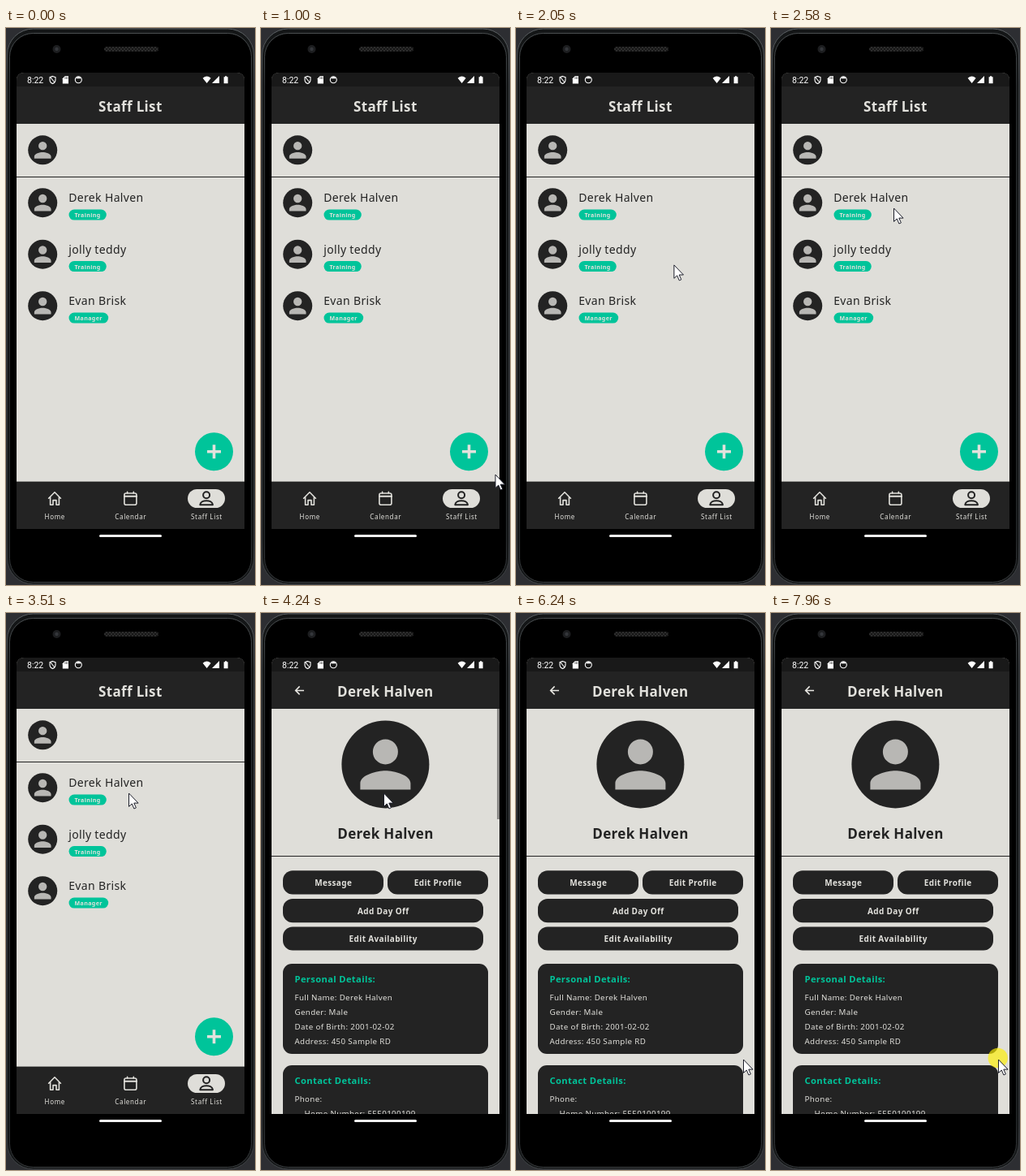
These frames come from a looping animation (307 by 686 pixels, 8 s). An HTML page:

```html
<!DOCTYPE html>
<html lang="en">
<head>
<meta charset="utf-8">
<title>Staff list</title>
<style>
  html, body { margin: 0; width: 100%; height: 100%; overflow: hidden; background: #2d2e32; }
  svg { display: block; width: 100%; height: 100%; }
  text { font-family: "Noto Sans", sans-serif; letter-spacing: .35px; fill: #e2e1dc; }
  .b { font-weight: 700; }
  .m { text-anchor: middle; }
  .dark { fill: #232323; }
  .teal { fill: #00c49a; }
</style>
</head>
<body>
<svg viewBox="0 0 307 686" id="stage">
  <defs>
    <clipPath id="screen"><path d="M13 617V65Q13 55 23 55H284Q294 55 294 65V617Z"/></clipPath>
    <pattern id="mesh" width="4" height="4" patternUnits="userSpaceOnUse">
      <path d="M0 4L4 0M0 0L4 4" stroke="#303030" stroke-width=".9"/>
    </pattern>
    <linearGradient id="rim" x2="0" y2="1">
      <stop offset="0" stop-color="#5c6164"/>
      <stop offset=".1" stop-color="#34383a"/>
      <stop offset=".92" stop-color="#2c3032"/>
      <stop offset="1" stop-color="#44484b"/>
    </linearGradient>
  </defs>

  <rect width="307" height="686" fill="#2d2e32"/>
  <rect x="1.5" y="1" width="304" height="684" rx="32" fill="#141617" stroke="url(#rim)"/>
  <rect x="4.5" y="6.5" width="298" height="676" rx="29" fill="#000" stroke="url(#rim)" stroke-width=".8"/>
  <circle cx="62.5" cy="26" r="5" fill="#1d1e20"/>
  <circle cx="62.5" cy="26" r="2.2" fill="#34363a"/>
  <rect x="121" y="23" width="67" height="6" rx="3" fill="#171717"/>
  <rect x="121" y="23" width="67" height="6" rx="3" fill="url(#mesh)"/>

  <g clip-path="url(#screen)">
    <rect x="13" y="55" width="281" height="562" fill="#dfded9"/>
    <rect x="13" y="55" width="281" height="63" class="dark"/>
    <rect x="13" y="55" width="281" height="17" fill="#191919"/>
    <g id="list"></g>
    <g id="profile"></g>
    <g id="status" fill="#fff">
      <text x="26" y="67.5" style="font:10.5px Roboto,sans-serif;letter-spacing:0;fill:#fff">8:22</text>
      <g fill="none" stroke="#fff" stroke-width="1.1">
        <path d="M57.5 59.4L61 60.7V63.7Q61 67 57.5 68.6Q54 67 54 63.7V60.7Z"/>
        <path d="M55 61L60 67"/>
        <circle cx="89.3" cy="63.8" r="4"/>
      </g>
      <path d="M72.6 59.3H77V68.5H69.8V62.2Z"/>
      <path d="M72.9 60.6V62.6M74.4 60.6V62.6M75.9 60.6V62.6" stroke="#191919" stroke-width=".7"/>
      <path d="M85.8 62.2Q89.3 58 92.8 62.2Z"/>
      <path d="M242.6 61.8Q247.6 57.4 252.6 61.8L247.6 68Z"/>
      <path d="M263 59V68H254Z"/>
      <path d="M268.6 60.2H270V59.2H272.2V60.2H273.6V68.2H268.6Z"/>
    </g>
  </g>
  <rect x="115" y="624" width="77" height="3" rx="1.5" fill="#f4f4f4"/>

  <circle id="tap" r="12.2" fill="#fff000" opacity=".66"/>
  <path id="cursor" d="M0 0V16.4L3.8 13 6.4 19 8.9 17.9 6.3 12.1H11.6Z" fill="#fff" stroke="#1d1f2b" stroke-width="1" stroke-linejoin="round"/>
</svg>
<script>
const $ = id => document.getElementById(id);
const PERSON = 'Derek Halven';

const text = (x, y, size, str, cls = '', extra = '') =>
  `<text x="${x}" y="${y}" font-size="${size}" class="${cls}" ${extra}>${str}</text>`;
const box = (x, y, w, h, r, cls = 'dark') =>
  `<rect x="${x}" y="${y}" width="${w}" height="${h}" rx="${r}" class="${cls}"/>`;
const avatar = (x, y, r) =>
  `<circle cx="${x}" cy="${y}" r="${r}" class="dark"/>
   <path transform="translate(${x} ${y}) scale(${r * .0718}) translate(-12 -12)" fill="#b8b7b4"
     d="M12 12a4 4 0 1 0 0-8a4 4 0 0 0 0 8zm0 2c-2.67 0-8 1.34-8 4v2h16v-2c0-2.66-5.33-4-8-4z"/>`;
const rule = y => box(13, y, 281, 1, 0);
const title = str => text(153.3, 103, 17, str, 'b m');

function staffRow([name, role, badge], i) {
  const y = 215.2 + i * 63.5;
  return avatar(45.2, y, 18) + text(77.2, y - 1, 14, name, 'dark') +
    box(77.5, y + 8.4, badge, 13, 6.5, 'teal') + text(84.5, y + 17.9, 7.1, role, 'b');
}

function listPage() {
  const staff = [[PERSON, 'Training', 46.3], ['jolly teddy', 'Training', 46.3], ['Evan Brisk', 'Manager', 48.7]];
  const tabs = [[60, 'Home'], [153.5, 'Calendar'], [247.2, 'Staff List']];
  return title('Staff List') + avatar(45.2, 150.3, 18) + rule(183) + staff.map(staffRow).join('') +
    `<circle cx="256.5" cy="521.8" r="23.5" class="teal"/>
     <path d="M248 521.8H265M256.5 513.3V530.3" stroke="#e2e1dc" stroke-width="3.6"/>` +
    box(13, 558.6, 281, 58.4, 0) +
    `<rect x="224" y="568" width="46" height="23" rx="11.5" fill="#dfded9"/>
     <g fill="none" stroke="#e2e1dc" stroke-width="1.6" stroke-linejoin="round" stroke-linecap="round">
       <path d="M52.6 579.2L60 571.8L67.4 579.2M54.6 577.4V587.2H58V581.6H62V587.2H65.4V577.4"/>
       <rect x="145.9" y="573" width="15" height="14.2" rx="2"/>
       <path d="M146 576.8H161" stroke-width="2"/>
       <path d="M149.6 571.2V573M157.3 571.2V573"/>
       <g stroke="#232323" stroke-width="2"><circle cx="247.1" cy="575.2" r="4"/>
       <path d="M239.3 587.2C239.8 580.6 254.4 580.6 254.9 587.2Z"/></g>
     </g>` +
    tabs.map(([x, s]) => text(x + .3, 605, 8, s, 'm', 'style="letter-spacing:.65px"')).join('');
}

function profilePage() {
  const buttons = [[27, 317.3, 124, 'Message'], [156, 317.3, 124, 'Edit Profile'],
    [27, 352, 247, 'Add Day Off'], [27, 386.4, 247, 'Edit Availability']];
  const facts = ['Full Name: ' + PERSON, 'Gender: Male', 'Date of Birth: 2001-02-02', 'Address: 450 Sample RD'];
  return title(PERSON) +
    `<path d="M53 95.4H42.8M47.6 90.4L42.6 95.4L47.6 100.4" fill="none" stroke="#e8e7e2" stroke-width="1.5"/>` +
    avatar(153.4, 186.4, 54) + text(153.5, 277.6, 17, PERSON, 'b m dark') + rule(299) +
    buttons.map(([x, y, w, s]) => box(x, y, w, 29.2, 12) + text(x + w / 2 + .2, y + 18.8, 10, s, 'b m')).join('') +
    box(27, 432, 253, 111, 11) + text(41.5, 455, 11.2, 'Personal Details:', 'b teal') +
    facts.map((s, i) => text(41.5, 477.4 + i * 17.9, 9.75, s)).join('') +
    box(27, 557, 253, 90, 11) + text(41.5, 580, 11.2, 'Contact Details:', 'b teal') +
    text(41.5, 602.4, 9.75, 'Phone:') + text(53.4, 620.3, 9.75, 'Home Number: 5550100199') +
    '<rect id="bar" x="291" y="118" width="3" height="136" fill="#8b8a88"/>';
}

$('list').innerHTML = listPage();
$('profile').innerHTML = profilePage();

const LOOP = 8000, STEP = 65.8, ENTER = 600, OPEN = 4240;
// time, x, y of the pointer tip
const path = [[600, 300, 671], [1390, 278, 429], [1585, 255.5, 399.5], [2245, 169, 246], [2570, 151.5, 222],
  [4560, 151.5, 222], [4850, 195, 322], [5140, 253, 452], [5400, 266, 458], [5800, 274, 510], [6190, 280.5, 550]];

function pointerAt(t) {
  const s = ENTER + Math.floor((t - ENTER) / STEP) * STEP;
  const i = path.findIndex(p => p[0] > s);
  if (i < 0) return path[path.length - 1].slice(1);
  if (i === 0) return path[0].slice(1);
  const a = path[i - 1], b = path[i], k = (s - a[0]) / (b[0] - a[0]);
  return [a[1] + (b[1] - a[1]) * k, a[2] + (b[2] - a[2]) * k];
}

const show = (el, on) => el.setAttribute('visibility', on ? 'visible' : 'hidden');

function draw(t) {
  const [x, y] = pointerAt(t);
  const opened = t >= OPEN;
  $('list').style.display = opened ? 'none' : '';
  $('profile').style.display = opened ? '' : 'none';
  $('bar').setAttribute('opacity', Math.max(0, Math.min(1, 1 - (t - 5460) / 260)));
  show($('cursor'), t >= ENTER);
  $('cursor').setAttribute('transform', `translate(${x} ${y})`);
  show($('tap'), (t >= 3380 && t < 3510) || t >= 7900);
  $('tap').setAttribute('cx', x - .8);
  $('tap').setAttribute('cy', y - (opened ? 2 : 0));
}

const start = performance.now();
function tick() {
  draw((performance.now() - start) % LOOP);
  requestAnimationFrame(tick);
}
tick();
</script>
</body>
</html>
```
